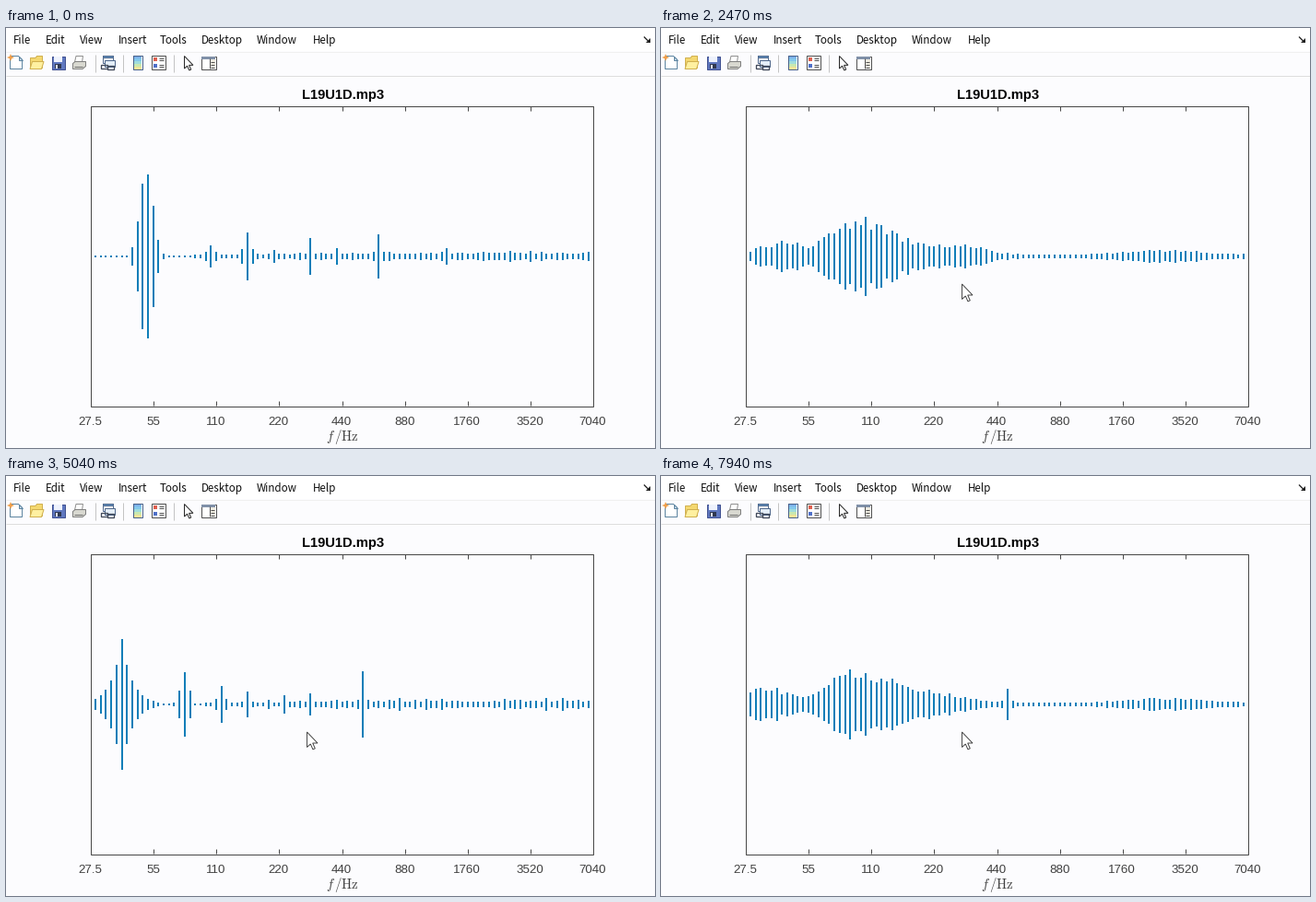
These frames come from a looping animation (704 by 456 pixels, 8 s). A matplotlib script:

```python
import numpy as np
import matplotlib.pyplot as plt
from matplotlib.animation import FuncAnimation
from matplotlib.collections import LineCollection
from matplotlib.patches import Polygon, Rectangle

W, H, DPI = 704, 456, 64
PT = 72 / DPI                      # points per pixel
STEP, FRAMES = 32, 250             # 8 s loop
BARS, MID, PULSE = 95, 248, 11     # PULSE: steps between hits
BG, INK, TEXT, BLUE = "#fcfcfe", "#484848", "#404040", "#0f7eb8"

fig = plt.figure(figsize=(W / DPI, H / DPI), dpi=DPI, facecolor=BG)
ax = fig.add_axes([0, 0, 1, 1])
ax.set_xlim(0, W)
ax.set_ylim(H, 0)
ax.axis("off")


def label(x, y, s, px, font, color=TEXT, ha="center", **kw):
    ax.text(x, y, s, fontsize=px * PT, family=font, color=color,
            ha=ha, va="baseline", **kw)


def rect(x, y, w, h, fc="none", ec="none", lw=1):
    ax.add_patch(Rectangle((x, y), w, h, fc=fc, ec=ec, lw=lw * PT))


def poly(pts, fc, ec="none", lw=1):
    p = Polygon(pts, closed=True, fc=fc, ec=ec, lw=lw * PT, joinstyle="miter")
    return ax.add_patch(p)


def lines(segs, color, lw=1):
    ax.add_collection(LineCollection(segs, colors=color, linewidths=lw * PT,
                                     capstyle="butt"))


def hline(x0, x1, y):
    return [(x0, y), (x1, y)]


def vline(x, y0, y1):
    return [(x, y0), (x, y1)]


ARROW = np.array([(0, 0), (0, 16.5), (3.8, 13), (6.4, 18.8), (8.8, 17.8),
                  (6.2, 12), (11.5, 12)])


def draw_menu():
    rect(0, 0, W, 25, "#ffffff")
    lines([hline(0, W, 25.5)], "#f0f0f0")
    names = ["File", "Edit", "View", "Insert", "Tools", "Desktop", "Window", "Help"]
    for x, s in zip([8, 43, 80, 122, 167, 212, 272, 333], names):
        label(x, 17, s, 11.6, "Noto Sans CJK JP", "#101010", "left")
    lines([[(692, 9.5), (697, 14.5)]], "#202020", 1.3)
    poly([(699, 11), (699, 16), (694, 16)], "#202020")
    lines([hline(0, W, 51.5)], "#dedede")


def draw_toolbar():
    lines([vline(x, 29, 48) for x in (96.5, 126.5, 181.5)], "#c4c4c4")
    # new page
    poly([(4.5, 30.5), (13.5, 30.5), (17.5, 34.5), (17.5, 44.5), (4.5, 44.5)],
         "#ffffff", "#5c84a0")
    poly([(13.5, 30.5), (13.5, 34.5), (17.5, 34.5)], "#cfe0ee", "#5c84a0")
    turn = np.arange(8) * np.pi / 4
    spike = np.where(np.arange(8) % 2, 1.7, 4)
    poly(np.c_[5 + spike * np.cos(turn), 32 + spike * np.sin(turn)], "#f0a04c")
    # folder
    poly([(26.5, 32.5), (32, 32.5), (33.5, 30.5), (39.5, 30.5), (39.5, 43.5),
          (26.5, 43.5)], "#f4d870", "#d0b050")
    poly([(28.5, 36.5), (41, 36.5), (38.5, 44.5), (26, 44.5)], "#fff0a0", "#d0b050")
    # floppy
    rect(49.5, 30.5, 14, 14, "#6078c0", "#405090")
    rect(52, 31, 9, 6, "#eef2fc")
    rect(53, 39, 7, 5, "#303850")
    rect(54, 40, 2, 4, "#e0e4f0")
    # printer
    poly([(76, 30.5), (83.5, 30.5), (82.5, 37), (74.5, 37)], "#ffffff", "#909090")
    poly([(72.5, 38.5), (75, 36.5), (86.5, 36.5), (86.5, 41.5), (83, 44.5),
          (72.5, 44.5)], "#d8d8d0", "#808080")
    lines([hline(74, 83, 41.5)], "#707070")
    # linked plots
    rect(104.5, 29.5, 11, 8, "#ffffff", "#50688c")
    rect(104.5, 29.5, 11, 2, "#6090c0", "#50688c")
    rect(106.5, 34.5, 11, 7, "#e4eef8", "#50688c")
    rect(102.5, 39.5, 7, 4, "none", "#404858", 1.3)
    rect(109.5, 40.5, 7, 4, "none", "#404858", 1.3)
    # colour bar
    for k, c in enumerate(["#7cb0e8", "#84c8ec", "#a0dcdc", "#c8e8b0", "#f0e498"]):
        rect(138, 30 + 3 * k, 9, 3.1, c)
    rect(137.5, 29.5, 10, 15, "none", "#486088")
    # legend
    rect(157.5, 29.5, 15, 15, "#ffffff", "#505050")
    rect(159.5, 31.5, 4, 4, "#e06050")
    rect(159.5, 38.5, 4, 4, "#5070c8")
    lines([hline(166, 171, y) for y in (32.5, 34.5, 39.5, 41.5)], "#505050")
    # pointer
    poly(ARROW * 0.82 + (193.5, 30.5), "#ffffff", "#282828")
    # property panel
    rect(211.5, 30.5, 16, 14, "#ffffff", "#505050")
    rect(212, 31, 15, 2.5, "#8090a8")
    rect(221, 34, 6, 10, "#f0ece0")
    lines([vline(220.5, 33, 44)], "#505050")
    lines([hline(222, 226, y) for y in (36.5, 39.5, 42.5)], "#505050")


def draw_axes():
    rect(91.5, 84.5, 545, 326, "none", INK)
    ticks = []
    for k in range(9):
        x = 91.5 + 545 * k / 8
        xt = np.floor(x) + 0.5
        ticks += [vline(xt, 405, 410), vline(xt, 85, 90)]
        label(x, 431, f"{27.5 * 2 ** k:g}", 13.4, "Liberation Sans")
    lines(ticks, INK)
    label(365.3, 77, "L19U1D.mp3", 14.7, "Liberation Sans", "#000000", weight="bold")
    label(365, 448, r"$f\,/\mathrm{Hz}$", 14.7, "DejaVu Serif", math_fontfamily="cm")


idx = np.arange(1, BARS + 1)


def bump(center, height, width, power=2):
    return height * np.exp(-(np.abs(idx - center) / width) ** power)


def tonal(seed, root, amps, width, power=2):
    """A bass note: wide fundamental, then overtones 12*log2(k) bars higher."""
    rng = np.random.default_rng(seed)
    floor = np.interp(idx, [20, 60], [1.2, 3]) + rng.exponential(idx / 70)
    peaks = [bump(root, amps[0], width, power)]
    for k, amp in enumerate(amps[1:], 2):
        peaks.append(bump(round(root + 12 * np.log2(k)), amp, 0.5 + 1.2 / k))
    return np.maximum(floor, np.max(peaks, axis=0))


def broad(seed, *humps):
    """A drum hit: smooth humps with uneven bars."""
    noise = np.random.default_rng(seed).uniform(0.8, 1.2, BARS)
    return noise * (2 + sum(bump(*h) for h in humps))


KICK = np.maximum(tonal(1, 10.7, (92, 12, 26, 7, 2, 20, 4, 9), 1.8), bump(55, 24, 0.8))
DEEP = tonal(2, 7, (65, 20, 16, 15, 7, 5, 4, 16, 3, 10, 3, 11), 2.3)
BASS = np.maximum(tonal(3, 6, (71, 35, 20, 14, 5, 10, 4, 12), 2, 1), bump(52, 36, 0.7))
SNARE = broad(4, (3.5, 13, 3), (10.5, 10, 2), (19.5, 32, 7.5), (31, 11, 9),
              (44, 6, 4), (80, 4, 10), (92, 5, 4))
CLAP = broad(5, (3, 7, 2), (7.5, 15, 3), (21, 32, 7), (31, 12, 9),
             (43, 7, 5), (80, 4, 10))
ROLL = broad(6, (4, 3, 4), (10.5, 19, 1.5), (21, 42, 7.5), (33, 15, 8),
             (47, 14, 1), (75, 2, 8))
SWELL = broad(7, (4, 15, 5), (21, 29, 7.5), (33, 13, 9), (50, 12, 0.7),
              (80, 4, 10))

TONAL, BROAD = [KICK, BASS, DEEP], [SNARE, CLAP, ROLL, SWELL]
ANCHORS = [(0, KICK), (30, SNARE), (77, CLAP), (112, DEEP), (157, BASS),
           (188, ROLL), (248, SWELL)]


def build_hits():
    """Fill the gaps between anchors with hits, drum and bass in turn."""
    hits = []
    for i, ((a, ha), (b, _)) in enumerate(zip(ANCHORS, ANCHORS[1:])):
        hits.append((a, ha))
        drum = any(ha is h for h in TONAL)
        count = round((b - a) / PULSE)
        for j in range(1, count):
            n = round(a + (b - a) * j / count)
            if drum:
                h = BROAD[(i + j) % len(BROAD)] * 1.1
            else:
                h = TONAL[(i + j) % len(TONAL)]
                h = h * np.interp(n, [30, 200], [55, 97]) / h.max()
            hits.append((n, h))
            drum = not drum
    return hits + [ANCHORS[-1]]


HITS = build_hits()
STARTS = [n for n, _ in HITS]


def heights(n):
    k = np.searchsorted(STARTS, n, side="right") - 1
    a, ha = HITS[k]
    if k == len(HITS) - 1:
        return ha
    b, hb = HITS[k + 1]
    u = np.clip((n - a - 1) / (b - a - 2), 0, 1)
    s = np.clip((u - 0.3) / 0.55, 0, 1)
    s = s * s * (3 - 2 * s)
    h = ha * (1 - 0.3 * u) * (1 - s) + hb * s
    flutter = np.random.default_rng(n).uniform(-0.2, 0.2, BARS)
    return h * (1 + flutter * np.sin(np.pi * u))


draw_menu()
draw_toolbar()
draw_axes()

bar_x = np.round(97.1 + 5.69 * (idx - 1))
bars = LineCollection([], colors=BLUE, linewidths=2 * PT, capstyle="butt")
ax.add_collection(bars)
cursor = poly(ARROW, "#ffffff", "#383838", 0.9)
cursor.set_zorder(5)

PATH_T = [780, 880, 960, 1090]
PATH_X = [710, 681, 348.5, 326.5]
PATH_Y = [204, 212, 268, 278]


def update(n):
    h = np.maximum(heights(n), 1)
    bars.set_segments([vline(x, MID - v, MID + v) for x, v in zip(bar_x, h)])
    t = n * STEP
    cursor.set_xy(ARROW + (np.interp(t, PATH_T, PATH_X), np.interp(t, PATH_T, PATH_Y)))
    return bars, cursor


anim = FuncAnimation(fig, update, frames=FRAMES, interval=STEP,
                     init_func=lambda: update(0), repeat=True, repeat_delay=0)
plt.show()
```
